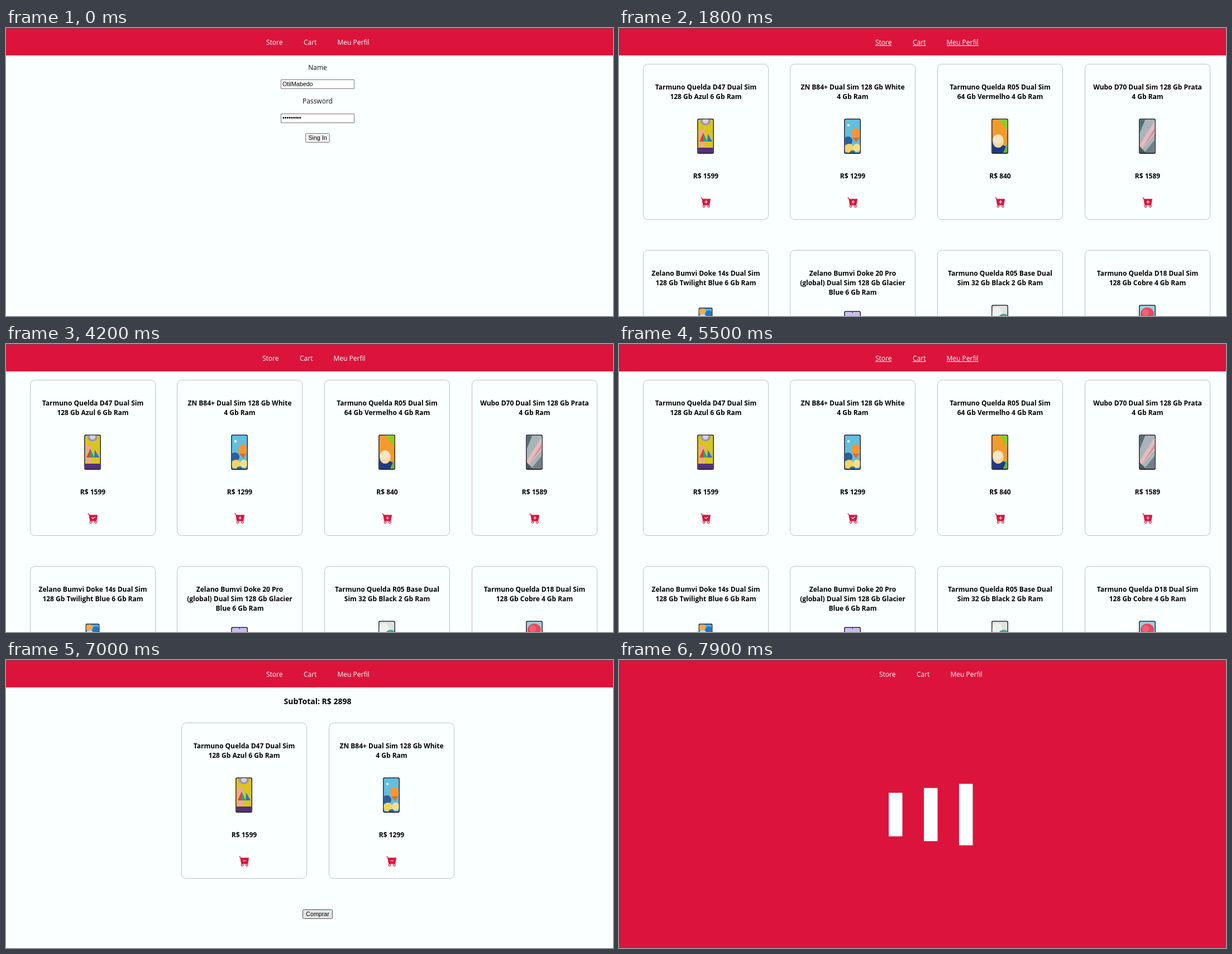
Recreate the animation shown at these times as an HTML page with a canvas. Size 1087 by 515 pixels, loop 8 s.

```html
<!DOCTYPE html>
<html lang="pt">
<head>
<meta charset="utf-8">
<title>Store</title>
<style>
  html, body { margin: 0; width: 100%; height: 100%; overflow: hidden; background: #faffff; }
  canvas, svg { position: absolute; left: 0; top: 0; width: 1087px; height: 515px; }
  text { font: 12px "Open Sans", "Noto Sans", sans-serif; fill: #111; }
  .light { fill: #fff; }
  .bold { font-weight: 700; fill: #000; }
  .total { font-weight: 700; font-size: 14px; fill: #000; }
  .ui { font: 10.67px "Liberation Sans", Arial, sans-serif; fill: #000; }
  .mid { text-anchor: middle; }
</style>
</head>
<body>
<canvas id="stage" width="1087" height="515"></canvas>
<svg id="texts" viewBox="0 0 1087 515"></svg>
<script>
const LOOP = 8000, RED = '#dc143c', PAGE = '#faffff';
const ctx = document.getElementById('stage').getContext('2d');
const svg = document.getElementById('texts');
const NS = 'http://www.w3.org/2000/svg';

// ---- shape helpers ----
function rect(x, y, w, h, color) {
  ctx.fillStyle = color;
  ctx.fillRect(x, y, w, h);
}
function box(x, y, w, h, r, fill, line) {
  ctx.beginPath();
  ctx.roundRect(x + .5, y + .5, w - 1, h - 1, r);
  if (fill) { ctx.fillStyle = fill; ctx.fill(); }
  ctx.lineWidth = 1;
  ctx.strokeStyle = line;
  ctx.stroke();
}
function oval(x, y, rx, ry, color) {
  ctx.beginPath();
  ctx.ellipse(x, y, rx, ry, 0, 0, 7);
  ctx.fillStyle = color;
  ctx.fill();
}
function trace(...p) {
  ctx.beginPath();
  for (let i = 0; i < p.length; i += 2) ctx.lineTo(p[i], p[i + 1]);
}
function poly(color, ...p) {
  trace(...p);
  ctx.fillStyle = color;
  ctx.fill();
}
function line(color, width, ...p) {
  trace(...p);
  ctx.strokeStyle = color;
  ctx.lineWidth = width;
  ctx.stroke();
}

// ---- products: title, price, image offset, wallpaper in a 30 x 63 space ----
const items = [
  { title: ['Tarmuno Quelda D47 Dual Sim', '128 Gb Azul 6 Gb Ram'], price: 1599, base: '#d9c520', art() {
    oval(15, 4, 9, 8, '#9a94b0');
    oval(15, 4, 5, 5, '#d6d2dc');
    rect(4, 19, 9, 31, '#f0a59a');
    rect(1, 52, 28, 10, '#54307c');
    poly('#e23b3b', 11, 25, 4, 41, 11, 41);
    poly('#1fa878', 11, 25, 18, 41, 11, 41);
    poly('#2f6fd0', 19, 27, 27, 41, 18, 41);
  } },
  { title: ['ZN B84+ Dual Sim 128 Gb White', '4 Gb Ram'], price: 1299, base: '#62bfdf', art() {
    rect(6, 10, 4, 4, '#eefaff');
    oval(7, 40, 8, 8, '#2b5f9e');
    oval(21, 27, 8, 10, '#f2963a');
    poly('#d9702a', 15, 34, 27, 34, 22, 43);
    oval(9, 53, 8, 8, '#f3d564');
    oval(23, 52, 7, 7, '#f5df8c');
    oval(15, 61, 5, 4, '#2f6aa8');
  } },
  { title: ['Tarmuno Quelda R05 Dual Sim', '64 Gb Vermelho 4 Gb Ram'], price: 840, base: '#f39a2c', art() {
    poly('#8fcb1e', 12, 0, 30, 0, 30, 24);
    poly('#1d3a86', 0, 38, 30, 52, 30, 63, 0, 63);
    poly('#6bb53a', 30, 40, 30, 63, 20, 63);
    oval(12, 40, 10, 12, '#f0d9a8');
    oval(11, 37, 8, 8, '#f6e6c6');
  } },
  { title: ['Wubo D70 Dual Sim 128 Gb Prata', '4 Gb Ram'], price: 1589, base: '#a9b4b8', art() {
    poly('#557078', 0, 0, 12, 0, 0, 30);
    poly('#e3bcc0', 30, 2, 30, 26, 4, 56, 2, 46);
    poly('#d58f96', 30, 14, 30, 22, 6, 52);
    poly('#6f7f86', 30, 36, 30, 63, 8, 63);
    poly('#47575e', 0, 48, 14, 63, 0, 63);
  } },
  { title: ['Zelano Bumvi Doke 14s Dual Sim', '128 Gb Twilight Blue 6 Gb Ram'], price: 1499, dy: 5, w: 25, base: '#48b2e6', art() {
    oval(8, 7, 8, 6, '#f4a94c');
    oval(22, 12, 8, 7, '#1f78c8');
    oval(9, 17, 8, 5, '#bfe4f6');
  } },
  { title: ['Zelano Bumvi Doke 20 Pro', '(global) Dual Sim 128 Gb Glacier', 'Blue 6 Gb Ram'], price: 1899, dy: 11, base: '#cdbcf0', art() {
    oval(15, 2.5, 1, 1, '#443c5c');
  } },
  { title: ['Tarmuno Quelda R05 Base Dual', 'Sim 32 Gb Black 2 Gb Ram'], price: 699, base: '#dfe3e1', art() {
    oval(10, 16, 9, 12, '#eef0ee');
    oval(22, 23, 9, 7, '#4aa889');
  } },
  { title: ['Tarmuno Quelda D18 Dual Sim', '128 Gb Cobre 4 Gb Ram'], price: 1199, base: '#9ccfe2', art() {
    oval(15, 16, 12, 11, '#e8485c');
    oval(12, 14, 6, 6, '#ee6474');
  } }
];
const inStore = items.map((item, i) => ({ item, x: Math.floor(43 + i % 4 * 263.7), y: i < 4 ? 64 : 397 }));
const inCart = items.slice(0, 2).map((item, i) => ({ item, x: 314 + i * 264, y: 112 }));
const NAV = [['Store', 466], ['Cart', 533], ['Meu Perfil', 593.5]];

// ---- text layers ----
function layer() {
  return svg.appendChild(document.createElementNS(NS, 'g'));
}
function text(parent, str, x, y, cls) {
  const el = document.createElementNS(NS, 'text');
  el.setAttribute('x', x);
  el.setAttribute('y', y);
  el.setAttribute('class', cls);
  el.textContent = str;
  parent.appendChild(el);
}
function cardText(parent, { item, x, y }) {
  const mid = x + 112.5;
  item.title.forEach((row, i) => text(parent, row, mid, y + 46 + i * 17, 'bold mid'));
  text(parent, 'R$ ' + item.price, mid, y + 205, 'bold mid');
}

const nav = layer();
const pages = { login: layer(), store: layer(), cart: layer() };
NAV.forEach(([word, x]) => text(nav, word, x, 30, 'light'));
text(pages.login, 'Name', 558, 75, 'mid');
text(pages.login, 'OtilMabedo', 495, 104, 'ui');
text(pages.login, 'Password', 558, 135, 'mid');
text(pages.login, '•'.repeat(9), 495, 164, 'ui');
text(pages.login, 'Sing In', 558, 200, 'ui mid');
inStore.forEach(c => cardText(pages.store, c));
text(pages.cart, 'SubTotal: R$ 2898', 558, 79, 'total mid');
inCart.forEach(c => cardText(pages.cart, c));
text(pages.cart, 'Comprar', 558, 458, 'ui mid');

// ---- drawing ----
function phone({ base, art, w = 30, dy = 0 }, mid, top) {
  ctx.save();
  ctx.translate(mid - w / 2, top + dy);
  ctx.scale(w / 30, 1);
  ctx.beginPath();
  ctx.roundRect(0, 0, 30, 63, 3);
  ctx.fillStyle = '#2c2a38';
  ctx.fill();
  ctx.beginPath();
  ctx.roundRect(1.5, 1.5, 27, 59.5, 2);
  ctx.clip();
  rect(0, 0, 30, 63, base);
  art();
  ctx.restore();
}

function trolley(x, y, mark) {
  ctx.save();
  ctx.translate(x, y);
  ctx.scale(1.2, 1.2);
  ctx.lineCap = ctx.lineJoin = 'round';
  line(RED, 1, .5, 1.5, 2, 1.5, 2.5, 3.5, 4, 11.5, 13, 11.5);
  poly(RED, 2.2, 3, 14.6, 3, 15, 3.5, 13.5, 12, 3.6, 12);
  for (const cx of [5, 12]) {
    ctx.beginPath();
    ctx.arc(cx, 14, 1.5, 0, 7);
    ctx.stroke();
  }
  if (mark === 'check') {
    line('#fff', 1, 6.5, 7, 8, 8.6, 11, 6);
  } else {
    line('#fff', 1, 6.5, 7.5, 10.5, 7.5);
    if (mark === 'plus') line('#fff', 1, 8.5, 5.5, 8.5, 9.5);
  }
  ctx.restore();
}

function card({ item, x, y }, mark) {
  box(x, y, 225, 279, 8, null, '#bcbfc0');
  phone(item, x + 112, y + 98);
  trolley(x + 103, y + 238, mark);
}

function button(x, y, w, h, hover) {
  box(x, y, w, h, 2, hover ? '#e5e5e5' : '#efefef', hover ? '#4f4f4f' : '#767676');
}

// CSS "ease" curve, solved by bisection
function ease(x) {
  if (x <= 0) return 0;
  let lo = 0, hi = 1;
  for (let i = 0; i < 24; i++) {
    const m = (lo + hi) / 2;
    if (.75 * m * (1 - m) + m ** 3 < x) lo = m; else hi = m;
  }
  return .3 * lo * (1 - lo) ** 2 + 3 * lo * lo * (1 - lo) + lo ** 3;
}

const draw = {
  login(t) {
    box(492, 92, 132, 17, 0, '#fff', '#767676');
    box(492, 153, 132, 17, 0, '#fff', '#767676');
    button(536, 188, 44, 17, t >= 600);
  },
  blank() {},
  store(t) {
    const added = [4200, 5100];
    inStore.forEach((c, i) => card(c, t >= added[i] ? 'check' : 'plus'));
  },
  cart(t) {
    inCart.forEach(c => card(c, 'minus'));
    button(531, 446, 54, 17, t >= 7000);
  },
  loader(t) {
    rect(0, 49, 1087, 466, RED);
    const run = Math.floor((t - 7400) / 100) * 100;
    for (let i = 0; i < 3; i++) {
      const h = 123 * (1 - ease((run - i * 134) / 2160));
      rect(483 + i * 63, 276.4 - h / 2, 24.5, h, PAGE);
    }
  }
};

function pageAt(t) {
  if (t < 1000) return 'login';
  if (t < 1200) return 'blank';
  if (t < 5900) return 'store';
  return t < 7400 ? 'cart' : 'loader';
}

function render(t) {
  const page = pageAt(t);
  const shift = page === 'store' ? -7 : 0;
  rect(0, 0, 1087, 515, PAGE);
  rect(0, 0, 1087, 49, RED);
  rect(0, 0, 1087, 1, '#6d4a52');
  if ((t >= 1800 && t < 3300) || (t >= 5500 && t < 6300)) {
    ctx.font = '12px "Open Sans", "Noto Sans", sans-serif';
    for (const [word, x] of NAV) rect(Math.round(x + shift), 31, Math.round(ctx.measureText(word).width), 1, '#fff');
  }
  draw[page](t);
  nav.setAttribute('transform', `translate(${shift} 0)`);
  for (const name in pages) pages[name].style.display = name === page ? '' : 'none';
}

const start = performance.now();
function tick() {
  render((performance.now() - start) % LOOP);
  requestAnimationFrame(tick);
}
tick();
</script>
</body>
</html>
```
